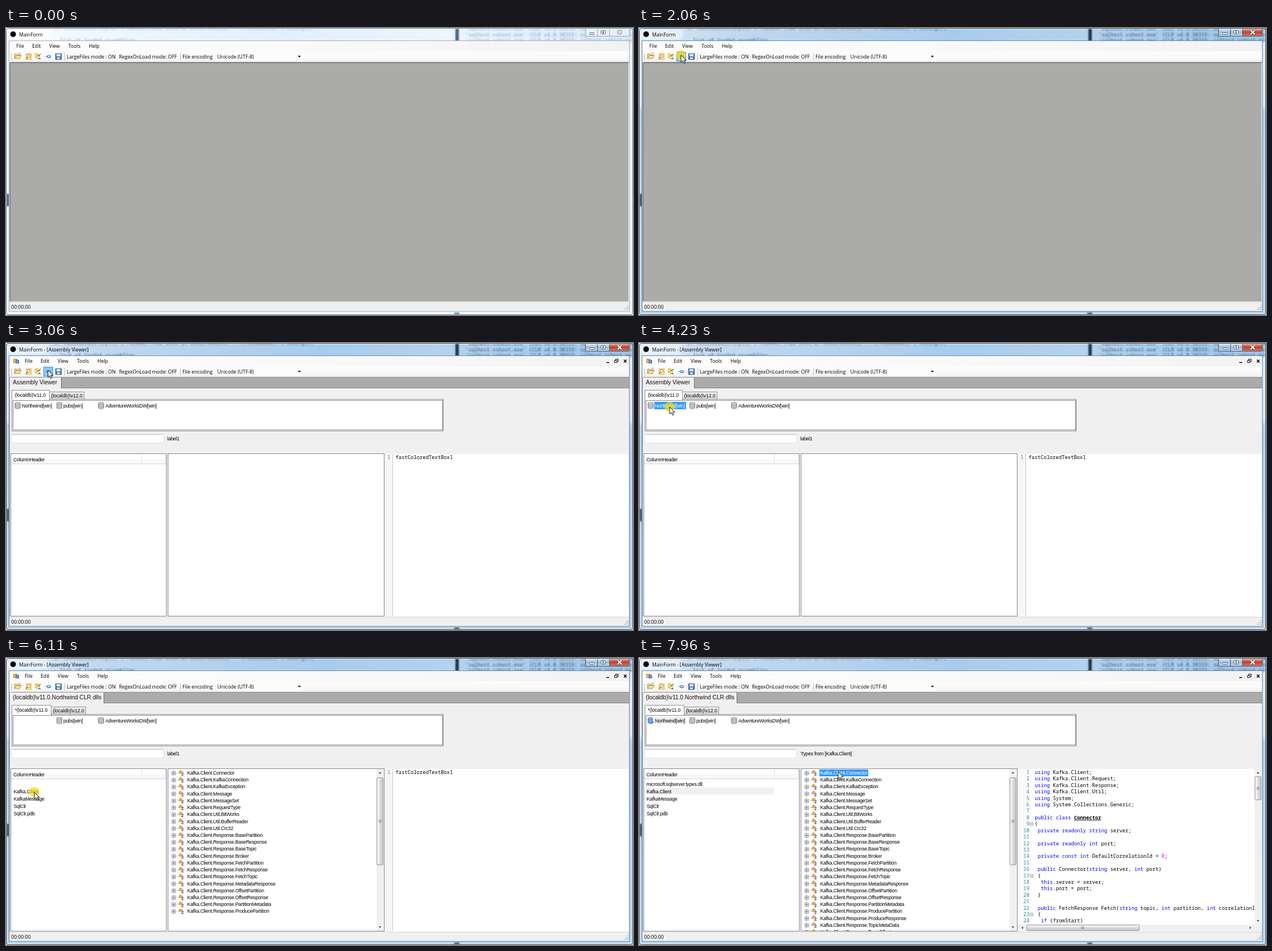
An HTML page that plays this animation: 1105x507 px, repeating every 8000 ms.

```html
<!DOCTYPE html>
<html lang="en">
<head>
<meta charset="utf-8">
<title>MainForm</title>
<style>
html, body { margin: 0; width: 100%; height: 100%; overflow: hidden; background: #fff; }
svg { display: block; }
text { white-space: pre; fill: #000; }
.ui { font: 8.7px "Open Sans", sans-serif; }
.form { font: 8.6px "Liberation Sans", sans-serif; letter-spacing: -.24px; }
.srv { font: 8.6px "Liberation Sans", sans-serif; letter-spacing: -.08px; }
.tab { font: 10.3px "Liberation Sans", sans-serif; letter-spacing: -.05px; }
.code { font: 8.87px "Noto Sans Mono", monospace; }
.num { fill: #2b8f9f; text-anchor: end; }
.kw { fill: #00f; }
.lit { fill: #f0f; }
.cls { font-weight: bold; text-decoration: underline; }
</style>
</head>
<body>
<svg id="stage" width="1105" height="507" viewBox="0 0 1105 507"></svg>
<script>
const LOOP = 8000, FACE = '#f0f0f0', EDGE = '#828790', BLUE = '#3399ff';

const rect = (x, y, w, h, fill, stroke, rx = 0) => stroke
  ? `<rect x="${x + .5}" y="${y + .5}" width="${w - 1}" height="${h - 1}" rx="${rx}" fill="${fill}" stroke="${stroke}"/>`
  : `<rect x="${x}" y="${y}" width="${w}" height="${h}" rx="${rx}" fill="${fill}"/>`;
const text = (x, y, s, cls = 'form', fill = '') =>
  `<text x="${x}" y="${y}" class="${cls}"${fill && ` style="fill:${fill}"`}>${s}</text>`;
const path = (d, fill = 'none', stroke = 'none', w = 1) =>
  `<path d="${d}" fill="${fill}" stroke="${stroke}" stroke-width="${w}"/>`;
const group = (id, body) => `<g id="${id}">${body}</g>`;
const at = (x, y, body) => `<g transform="translate(${x} ${y})">${body}</g>`;
const clip = (x, y, w, h, body) =>
  `<svg x="${x}" y="${y}" width="${w}" height="${h}" viewBox="${x} ${y} ${w} ${h}">${body}</svg>`;
const grad = (id, dir, ...stops) =>
  `<linearGradient id="${id}" x2="${dir === 'h' ? 1 : 0}" y2="${dir === 'h' ? 0 : 1}">` +
  stops.map(([o, c]) => `<stop offset="${o}" stop-color="${c}"/>`).join('') + '</linearGradient>';

const defs = '<defs>' +
  grad('idleFill', 'h', [0, '#fdfeff'], [.12, '#f0f7fe'], [.45, '#e3effb'], [.7, '#edf5fd'], [1, '#d9eafb']) +
  grad('liveFill', 'h', [0, '#dbe8f5'], [.15, '#c0d8f0'], [.5, '#a9cbeb'], [.7, '#b4d2ee'], [1, '#9fc4e8']) +
  grad('sideFill', 'v', [0, '#dce9f6'], [.27, '#d5e5f5'], [.29, '#aacbea'], [1, '#b5d3ef']) +
  grad('menuFill', 'h', [0, '#fdfdfd'], [.6, '#f8f8f8'], [1, '#f2f2f2']) +
  grad('toolFill', 'v', [0, '#fcfcfc'], [.5, '#fafafa'], [1, '#eeeeee']) +
  grad('red', 'v', [0, '#e3a79c'], [.45, '#d0705f'], [.5, '#bd3f2b'], [1, '#d3765c']) +
  grad('pane', 'v', [0, '#d5e4f3'], [.45, '#bcd3ea'], [.5, '#9dbddd'], [1, '#b8d3ec']) +
  grad('tabOff', 'v', [0, '#f2f2f2'], [.5, '#ebebeb'], [1, '#d2d2d2']) +
  grad('thumbV', 'h', [0, '#f4f4f4'], [.5, '#e6e6e7'], [.5, '#d6d7da'], [1, '#c8c9cc']) +
  grad('thumbH', 'v', [0, '#f4f4f4'], [.5, '#e6e6e7'], [.5, '#d6d7da'], [1, '#c8c9cc']) +
  '<filter id="soft" x="-20%" y="-200%" width="140%" height="500%"><feGaussianBlur stdDeviation="1.3"/></filter></defs>';

// Window frame in its inactive and active looks
function glass(active) {
  const ink = active ? '#14304f' : '#4469b4';
  const line = (x, y, s) => text(x, y, s, 'code', ink);
  let out = rect(0, 0, 1105, 507, active ? 'url(#sideFill)' : '#e9f2fb') +
    rect(0, 0, 1105, 23, active ? 'url(#liveFill)' : 'url(#idleFill)') +
    rect(0, 501, 1105, 6, active ? '#b9d5ef' : '#eef5fc');
  let blur = line(85, 3, 'if (assemblies.Any()) { foreach (var item in items.Where(x => x.IsLoaded)) { Adding();') +
    line(84, 25, '- list of loaded assemblies');
  for (let i = 0; i < 3; i++)
    blur += line(810, 4 + i * 10.5, "'sqlhost.vshost.exe' (CLR v4.0.30319: sqlhost.vshost.exe)");
  out += `<g filter="url(#soft)"><g opacity="${active ? .75 : .6}">${blur}</g>` +
    rect(792, -2, 6, 27, active ? '#23384f' : '#4a6585') +
    rect(790, 503, 9, 4, active ? '#23384f' : '#4a6585') +
    rect(0, 293, 5, 22, active ? '#24405f' : '#32527c') + '</g>';
  out += rect(3, 3, 75, 17, active ? 'rgba(255,255,255,.45)' : 'rgba(255,255,255,.6)', '', 8);
  const edge = active ? '#4b637c' : '#9aabbe', fill = active ? 'url(#pane)' : '#e8f1fa';
  out += rect(1021, -2, 22, 17, fill, edge, 3) + rect(1042, -2, 22, 17, fill, edge) +
    rect(1063, -2, 36, 17, active ? 'url(#red)' : fill, edge, 3);
  out += rect(1028, 8, 9, 4, '#fff', '#535666', 1) + rect(1048, 4, 9, 7, '#fff', '#535666', 1) +
    rect(1051, 6, 3, 3, '#fff', '#535666') +
    path('M1078 4l7 7M1085 4l-7 7', 'none', '#535666', 3.6) + path('M1078 4l7 7M1085 4l-7 7', 'none', '#fff', 1.9);
  return out + rect(0, 0, 1105, 507, 'none', active ? '#2f3a46' : '#6d747c', 5) +
    rect(1, 1, 1103, 505, 'none', 'rgba(255,255,255,.7)', 4) +
    rect(5, 22, 1094, 479, FACE, active ? '#6f8aa5' : '#a5b1bd');
}

const database = (x, y, c, fill) => at(x, y,
  path('M-4-3.5v7c0 2.4 8 2.4 8 0v-7', fill, c, .9) +
  `<ellipse cy="-3.5" rx="4" ry="1.7" fill="${fill}" stroke="${c}" stroke-width=".9"/>` +
  path('M-4-1c0 2.2 8 2.2 8 0M-4 1.5c0 2.2 8 2.2 8 0', 'none', c, .9));
const grayDb = (x, y) => rect(x - 5, y - 6, 11, 12, '#ececec', '#b0b0b0', 2) + database(x + .5, y, '#8f8f8f', '#d8d8d8');

function toolIcons() {
  const gold = '#e7b13c', brown = '#a8762a';
  return at(21, 50, path('M-6 4v-8h4l1 1.5h5v2', '#f5d98a', brown, .8) + path('M-6 4l3-5.5h9l-3 5.5z', '#ffe08a', brown, .8) +
      path('M1-5q3-1.5 4 1', 'none', '#4a6ea8')) +
    at(40, 50, rect(-5, -5, 10, 11, '#f8e2ae', gold) + `<circle r="2.6" cy="-.5" fill="#fff" stroke="${brown}"/>` + path('M-2 1.5l-3 3', 'none', brown, 1.4)) +
    at(56, 50, rect(-5, -5, 6, 8, '#f7d883', gold) + rect(-2, -1, 6, 6, '#fff3c9', gold) + path('M0 0l5-4M1 3l4 2', 'none', '#40557a', 1.2)) +
    at(92, 50, rect(-5, -5, 11, 11, '#4f81bd', '#2f5486') + rect(-3, -4, 7, 4, '#e6eef8') + rect(-2, 2, 5, 3, '#dfe5ee'));
}
const plug = at(74, 50, path('M-5 .5h3', 'none', '#6f8fb8') + rect(-2, -2, 7, 5, '#79aee0', '#3f74b4', 1.5) + rect(0, -1, 3, 2, '#e8f4ff'));

function menuBar() {
  const names = { File: 18, Edit: 46, View: 76, Tools: 110, Help: 146 };
  let dots = '';
  for (let y = 46; y < 57; y += 3) dots += rect(9, y, 1.5, 1.5, '#a0a0a0');
  return rect(6, 23, 1092, 18, 'url(#menuFill)') + rect(6, 41, 1092, 20, 'url(#toolFill)') +
    rect(7, 60, 1091, 1, '#8d8d8d') + group('viewHot', rect(69, 24, 33, 17, '#c4e1fb', '#7fb9f2')) +
    group('names', Object.entries(names).map(([s, x]) => text(x, 35, s, 'ui')).join('')) +
    dots + rect(103, 44, 1, 13, '#bdbdbd') + rect(307, 44, 1, 13, '#bdbdbd') +
    text(107, 53.5, 'LargeFiles mode : ON', 'ui') + text(199, 53.5, 'RegexOnLoad mode: OFF', 'ui') +
    text(311, 53.5, 'File encoding', 'ui') + rect(370, 43, 153, 15, '#fcfcfc') +
    text(372.5, 54, 'Unicode (UTF-8)', 'ui') + path('M514.5 49h5l-2.5 3z', '#000') +
    group('hot', rect(66, 42, 17, 17, '#c0defa', BLUE)) + group('pressed', rect(66, 42, 17, 17, '#8fc5fb', BLUE)) +
    toolIcons() + plug;
}

const stripTab = (w, s) => rect(7, 61, w, 19, FACE) + rect(7 + w, 61, 1, 18, '#6f6f6f') + text(12, 73, s, 'tab', '#1a0a12');
const serverTabs = (mark, w) =>
  rect(9 + w, 86, 62, 14, 'url(#tabOff)', '#8c8e94') + rect(10, 83, w, 18, '#fff', '#8c8e94') + rect(11, 98, w - 2, 4, '#fff') +
  text(15.5, 94.5, mark + '(localdb)\\v11.0', 'srv') + text(w + 12.5, 96, '(localdb)\\v12.0', 'srv');

function scrollV(x, y, h, top, len) {
  const c = x + 6, b = y + h - 7, m = top + len / 2;
  return rect(x, y, 12, h, '#f0f0f0') + path(`M${c - 2.5} ${y + 8}h5l-2.5-3zM${c - 2.5} ${b - 1}h5l-2.5 3z`, '#505050') +
    rect(x, top, 12, len, 'url(#thumbV)', '#979797', 1.5) +
    path(`M${c - 2.5} ${m - 2}h5m-5 2h5m-5 2h5`, 'none', '#777', .8);
}

function childForm() {
  return rect(7, 61, 1091, 19, '#ababa9') + rect(7, 79, 1091, 1, '#858585') + rect(7, 80, 1091, 403, FACE) +
    group('tabA', stripTab(90, 'Assembly Viewer')) +
    group('tabB', stripTab(165, '(localdb)\\v11.0.Northwind CLR dlls')) +
    rect(10, 99, 761, 57, '#fff', '#8c8e94') + group('srvA', serverTabs('', 67)) + group('srvB', serverTabs('*', 70)) +
    rect(12, 101, 758, 53, '#fff', EDGE) +
    group('nwGray', grayDb(20, 110.5)) + group('nwBlue', database(20, 110.5, '#2458c8', '#a9c9ff') + path('M21 114l2 2 3-4', 'none', '#2458c8')) +
    group('nwText', text(28, 113.5, 'Northwind[win]')) +
    group('nwFocus', rect(27, 104, 56, 13, BLUE) + text(28, 113.5, 'Northwind[win]', 'form', '#fff')) +
    group('nwDim', rect(27, 104, 56, 13, FACE) + text(28, 113.5, 'Northwind[win]')) +
    grayDb(93.5, 110.5) + text(101, 113.5, 'pubs[win]') + grayDb(167, 110.5) + text(175, 113.5, 'AdventureWorksDW[win]') +
    rect(9, 161, 269, 16, '#fff', '#e0e4ea') + rect(10, 161, 267, 1, '#b8bbc2') +
    group('boxHot', rect(9, 161, 269, 16, '#fff', '#8fbfe8')) +
    group('labelA', text(284, 171.5, 'label1')) + group('labelB', text(285, 171.5, 'Types from [Kafka.Client]')) +
    rect(8, 195, 275, 288, '#fff', EDGE) + rect(9, 213, 273, 1, '#d5d5d5') + rect(9, 206, 273, 7, '#f7f8fa') +
    rect(238, 197, 1, 17, '#dedfe1') + rect(281, 197, 1, 17, '#e6e6e6') + text(13, 209, 'ColumnHeader') +
    rect(285, 195, 382, 288, '#fff', EDGE) + rect(668, 196, 430, 287, '#fff');
}

function dllList() {
  const names = ['Kafka.Client', 'KafkaMessage', 'SqlClr', 'SqlClr.pdb'];
  return group('types', text(13, 225.5, 'microsoft.sqlserver.types.dll')) +
    group('rowDim', rect(12, 229, 226, 12, FACE)) +
    group('dlls', names.map((s, i) => text(13.5, 238.5 + 13 * i, s)).join('')) +
    group('rowFocus', rect(12, 229, 226, 12, BLUE) + text(13.5, 238.5, names[0], 'form', '#fff'));
}

function typeTree() {
  const names = ('Connector KafkaConnection KafkaException Message MessageSet RequestType Util.BitWorks Util.BufferReader Util.Crc32 ' +
    'BasePartition BaseResponse BaseTopic Broker FetchPartition FetchResponse FetchTopic MetadataResponse OffsetPartition ' +
    'OffsetResponse PartitionMetadata ProducePartition ProduceResponse TopicMetaData TopicOffset').split(' ');
  const row = (s, i) => at(0, 203 + 12.22 * i,
    path('M295-6v12M299 .5h6', 'none', '#b5b5b5', .6) + rect(292, -3, 7, 7, '#fff', '#919191') +
    path('M293.5 .5h4M295.5-1.5v4', 'none', '#304a90', .9) +
    path('M304-1l3.5-4 3.5 3-3.5 3.5z', '#e8b33c', '#a9761c', .6) + path('M309 0l2-1.5 2.5 2-2 2z', '#4d86d8') +
    path('M308 3.5l2-1.5 3.5 1.5-2 2z', '#d0608c') +
    text(319.5, 3, 'Kafka.Client.' + (i > 8 ? 'Response.' : '') + s));
  const rows = names.map(row);
  return group('tree', clip(286, 196, 367, 286, rows.slice(0, 21).join('') + group('treeRest', rows.slice(21).join('')))) +
    group('treeBar', scrollV(653, 196, 286, 211, 155)) +
    group('pick', rect(318, 197, 86, 12, BLUE) + text(319.5, 206, 'Kafka.Client.Connector', 'form', '#fff'));
}

function codePane() {
  const src = `using Kafka.Client;
using Kafka.Client.Request;
using Kafka.Client.Response;
using Kafka.Client.Util;
using System;
using System.Collections.Generic;

public class Connector
{
 private readonly string server;

 private readonly int port;

 private const int DefaultCorrelationId = 0;

 public Connector(string server, int port)
 {
  this.server = server;
  this.port = port;
 }

 public FetchResponse Fetch(string topic, int partition, int correlationId)
 {
  if (fromStart)`.split('\n');
  const color = s => s
    .replace(/\b(using|public|class|private|readonly|string|int|const|this|if)\b/g, '<tspan class="kw">$1</tspan>')
    .replace(/(class<\/tspan> )(\w+)/, '$1<tspan class="cls">$2</tspan>')
    .replace(/= (\d)/, '= <tspan class="lit">$1</tspan>');
  let out = rect(668, 196, 24, 275, '#fafafa');
  src.forEach((s, i) => {
    const y = 205 + 11.41 * i;
    out += text(688, y, i + 1, 'code num') + text(697.5, y, color(s), 'code');
    if (s.trim() === '{') out += rect(689, Math.round(y) - 6, 6, 6, '#fff', '#b0b0b0') + path(`M690.5 ${Math.round(y) - 3}h3`, 'none', '#666', .8);
  });
  return group('codeA', rect(668, 196, 13, 287, '#f6f6f6') + rect(681, 196, 1, 287, '#c4c8cc') +
      text(677.5, 205, '1', 'code num') + text(686.5, 205, 'fastColoredTextBox1', 'code')) +
    group('codeB', clip(668, 196, 417, 275, out) + scrollV(1085, 196, 275, 209, 42) + rect(668, 471, 430, 12, FACE) +
      path('M677 474v5l-3-2.5zM1076 474v5l3-2.5z', '#505050') + rect(683, 471, 199, 11, 'url(#thumbH)', '#979797', 1.5) +
      path('M780 474v5m2-5v5m2-5v5', 'none', '#777', .8));
}

function statusBar() {
  let grip = '';
  for (let i = 0; i < 3; i++) for (let j = 0; j <= i; j++) grip += rect(1095 - 3 * j, 490 + 3 * i, 1.6, 1.6, '#a6a6a6');
  return rect(6, 483, 1092, 17, FACE) + rect(6, 484, 1092, 1, '#dcdcdc') + text(9, 496, '00:00:00', 'ui') + grip;
}

const stage = document.getElementById('stage');
stage.innerHTML = defs + group('idleFrame', glass(false)) + group('liveFrame', glass(true)) +
  '<circle cx="12.5" cy="11" r="5" fill="#000"/>' +
  group('titleA', text(23, 14.5, 'MainForm', 'ui')) + group('titleB', text(23, 14.5, 'MainForm - [Assembly Viewer]', 'ui')) +
  menuBar() + rect(6, 61, 1092, 422, '#ababa9') + rect(7, 61, 1, 422, '#777') + rect(7, 61, 1090, 1, '#777') + rect(1097, 61, 1, 422, '#fff') +
  group('child', childForm() + dllList() + typeTree() + codePane() +
    rect(13, 28, 7, 7, '#f0c050', '#b08020') + rect(17, 30, 6, 6, '#6fa0e0', '#3b66a8') +
    path('M1058 34.5h5M1089 29.5l4.5 5m0-5l-4.5 5', 'none', '#000', 1.5) + path('M1074.5 31v-2.5h4.5v4h-1.5M1072.5 31h4.5v3.5h-4.5z', 'none', '#000')) +
  statusBar() + group('halo', '<circle r="9" fill="#f2dc1c" opacity=".75"/>') +
  group('cursor', path('M0 0v12.5l3-2.7 2.1 4.7 2-.9-2-4.6h4z', '#fff', '#000', .9));

const OPEN = 3060, CLICK = 4230, READ = 6110, PICK = 7590;
// Times at which each part appears, disappears, appears again...
const spans = {
  idleFrame: [0, 2060], liveFrame: [2060], titleA: [0, OPEN], titleB: [OPEN], child: [OPEN],
  viewHot: [1100, 1290], hot: [1360, 2060], pressed: [2060, 3610], boxHot: [5708, 5785],
  tabA: [0, 4460], tabB: [4460], srvA: [0, 4390], srvB: [4390],
  nwGray: [0, 4390], nwBlue: [4390, READ, READ + 80], nwText: [0, CLICK], nwFocus: [CLICK, READ], nwDim: [READ + 80],
  types: [4460, READ, READ + 80], dlls: [4460], rowFocus: [READ + 80, PICK], rowDim: [PICK],
  labelA: [0, READ + 80], labelB: [READ + 80], tree: [READ], treeRest: [READ + 80], treeBar: [READ], pick: [PICK],
  codeA: [0, 7750], codeB: [7750], cursor: [410],
  halo: [2060, 2150, CLICK, CLICK + 80, READ, READ + 80, PICK, PICK + 80]
};
// Pointer moves: first step, last step, steps, quadratic curve
const moves = [
  [410, 1190, 11, 1130, 475, 150, -110, 82, 34],
  [1290, 1430, 3, 82, 34, 82, 42, 74, 48],
  [3610, 4080, 7, 74, 48, 115, 100, 54, 113],
  [5400, 5940, 8, 54, 113, 90, 135, 50, 237],
  [6720, 7500, 10, 50, 237, 210, 255, 362, 201],
  [7960, 7960, 1, 362, 201, 356, 201, 351, 201]
];
const parts = Object.keys(spans).map(id => [document.getElementById(id), spans[id]]);
const cursor = document.getElementById('cursor'), halo = document.getElementById('halo'), names = document.getElementById('names');

function pointer(t) {
  const [t0, t1, n, x0, y0, cx, cy, x1, y1] = moves.findLast(m => t >= m[0]) || moves[0];
  const step = Math.max(1, (t1 - t0) / Math.max(1, n - 1));
  const k = Math.min(n, Math.floor((t - t0) / step + 1e-6) + 1);
  const u = Math.max(0, k / n), v = 1 - u;
  return [v * v * x0 + 2 * u * v * cx + u * u * x1, v * v * y0 + 2 * u * v * cy + u * u * y1];
}

function draw(t) {
  for (const [el, times] of parts)
    el.style.display = times.filter(x => t >= x).length % 2 ? '' : 'none';
  const place = `translate(${pointer(t).map(Math.round)})`;
  cursor.setAttribute('transform', place);
  halo.setAttribute('transform', place);
  names.setAttribute('transform', `translate(${t >= OPEN ? 15 : 0})`);
}

const start = performance.now();
function tick() {
  draw((performance.now() - start) % LOOP);
  requestAnimationFrame(tick);
}
draw(0);
requestAnimationFrame(tick);
</script>
</body>
</html>
```
